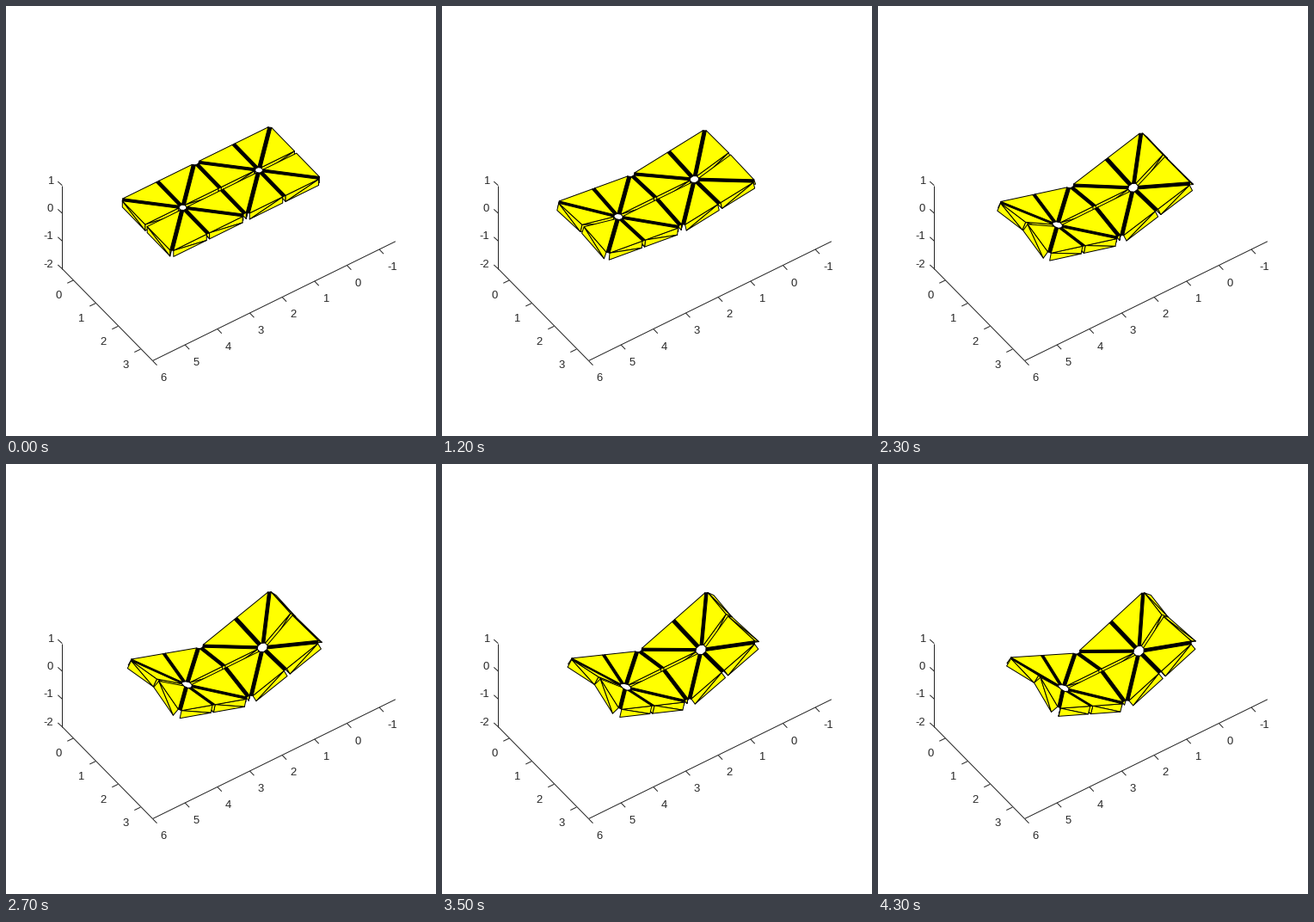
Recreate the animation shown at these times as a matplotlib script. Size 500 by 500 pixels, loop 4.4 s.

```python
import numpy as np
import matplotlib.pyplot as plt
from matplotlib.animation import FuncAnimation
from matplotlib.collections import LineCollection, PolyCollection

FRAMES, HOLD = 44, 4
PX = 0.72                       # points per pixel at 100 dpi
LEG, INSET, THICK = 1.175, 0.045, 0.22
INRADIUS = LEG * (1 - np.sqrt(0.5))

# screen vectors of the x, y and z units, and the direction to the viewer
AXES = np.array([[26, 26.75], [-37.65, 18.5], [0, -32.3]])
VIEW = np.array([0.58, 0.405, 0.707])
MIDDLE = np.array([249.8, 212.6])
INK, YELLOW = "#262626", "#ffff00"

fig = plt.figure(figsize=(5, 5), dpi=100, facecolor="white")
ax = fig.add_axes([0, 0, 1, 1])
ax.set_xlim(0, 500)
ax.set_ylim(500, 0)
ax.axis("off")


def draw_axes():
    corner, front = np.array([65.3, 305.5]), np.array([170.5, 412.5])
    ex, ey, ez = AXES
    lines = [[corner, corner + 3 * ez], [corner, front],
             [front, front - 7.5 * ey]]

    def tick(at, way, text, shift, align):
        lines.append([at, at + way])
        ax.text(*(at + shift), text, color=INK, fontsize=13 * PX,
                family="Liberation Sans", ha=align, va="center_baseline")

    for x in range(4):
        tick(corner + (x + 0.5) * ex, (-7, 3.4), str(x), (-14, 17), "right")
    for y in range(-1, 7):
        tick(front + (y - 6) * ey, (5, 5.2), str(y), (9, 19.5), "left")
    for z in range(-2, 2):
        tick(corner + (z + 2) * ez, (-5, -4.5), str(z), (-10.3, -6.5), "right")
    ax.add_collection(LineCollection(lines, colors=INK, linewidths=PX))


def fold_angle(step):
    return np.radians(57) * np.tanh(step / 28)


def corner_angles(psi):
    """Drop of the inner and outer corners that keeps every panel rigid."""
    a = 0.28 * psi
    p, q = np.cos(a), np.sin(psi) - np.sin(a) * np.cos(psi)
    goal = (np.cos(psi) + np.sin(a) * np.sin(psi)) / np.hypot(p, q)
    return a, np.arccos(min(1, goal)) - np.arctan2(q, p)


def inset(tri):
    sides = np.linalg.norm(np.roll(tri, -1, 0) - np.roll(tri, 1, 0), axis=1)
    hub = sides @ tri / sides.sum()
    return hub + (tri - hub) * (1 - INSET / INRADIUS)


def cell(side, psi):
    """Eight inset triangles around one vertex; side is +1 or -1 along y."""
    a, b = corner_angles(psi)
    centre = np.array([0, side * LEG, 0])
    out = np.array([0, side * np.cos(psi), np.sin(psi)])
    normal = np.array([0, -side * np.sin(psi), np.cos(psi)])

    def inner(sx):
        return LEG * np.array([sx * np.cos(a), 0, -np.sin(a)])

    def outer(sx):
        return centre + LEG * (out + [sx * np.cos(b), 0, 0]
                               - np.sin(b) * normal)

    def mid(sx):
        return (inner(sx) + outer(sx)) / 2

    rim = [np.zeros(3), inner(1), mid(1), outer(1), centre + LEG * out,
           outer(-1), mid(-1), inner(-1)]
    return [inset(np.array([centre, rim[i], rim[(i + 1) % 8]]))
            for i in range(8)]


def unit_normal(tri):
    n = np.cross(tri[1] - tri[0], tri[2] - tri[0])
    return n * np.sign(n[2]) / np.linalg.norm(n)


def walls(tri):
    """Triangulated side faces that turn towards the viewer."""
    n = unit_normal(tri)
    hub, low = tri.mean(0), tri - THICK * n
    faces = []
    for i in range(3):
        j = (i + 1) % 3
        away = np.cross(tri[j] - tri[i], n)
        away *= np.sign(away @ (tri[i] - hub))
        if away @ VIEW > 0:
            faces.append(np.array([tri[i], tri[j], low[i]]))
            faces.append(np.array([tri[j], low[j], low[i]]))
    return faces


def depth(face):
    return face.mean(0) @ VIEW


def build(step):
    psi = fold_angle(step)
    cells = [cell(1, psi), cell(-1, psi)]
    panels = cells[0] + cells[1]

    sides = sorted((f for tri in panels for f in walls(tri)), key=depth)
    tops = sorted((t for t in panels if unit_normal(t) @ VIEW > 0), key=depth)

    gaps = []
    for tris in cells:
        for i in (1, 2, 3, 5, 6, 7):
            a, b = tris[i - 1], tris[i]
            gaps.append(np.array([a[0], a[2], b[1], b[0]]))
    for i in (0, 7):
        a, b = cells[0][i], cells[1][i]
        gaps.append(np.array([a[1], a[2], b[2], b[1]]))

    holes = []
    for tris in cells:
        tips = np.array([t[0] for t in tris])
        hub = tips.mean(0)
        holes.append(hub + (tips - hub) * (0.85 + 0.55 * psi))

    # the lower edge of the far end stays in place
    shift = np.array([0, THICK * np.sin(psi) - LEG * (1 - np.cos(psi)),
                      THICK * (np.cos(psi) - 1) - LEG * np.sin(psi)])
    faces = sides + gaps + tops + holes
    colors = ([YELLOW] * len(sides) + ["black"] * len(gaps)
              + [YELLOW] * len(tops) + ["white"] * len(holes))
    return [(f + shift) @ AXES + MIDDLE for f in faces], colors


draw_axes()
sheet = PolyCollection([], edgecolors="black", linewidths=PX,
                       joinstyle="round", zorder=3)
ax.add_collection(sheet, autolim=False)


def update(frame):
    verts, colors = build(max(0, frame - HOLD))
    sheet.set_verts(verts)
    sheet.set_facecolor(colors)
    return [sheet]


anim = FuncAnimation(fig, update, frames=FRAMES, interval=100, repeat=True,
                     repeat_delay=0, blit=False)
plt.show()
```
